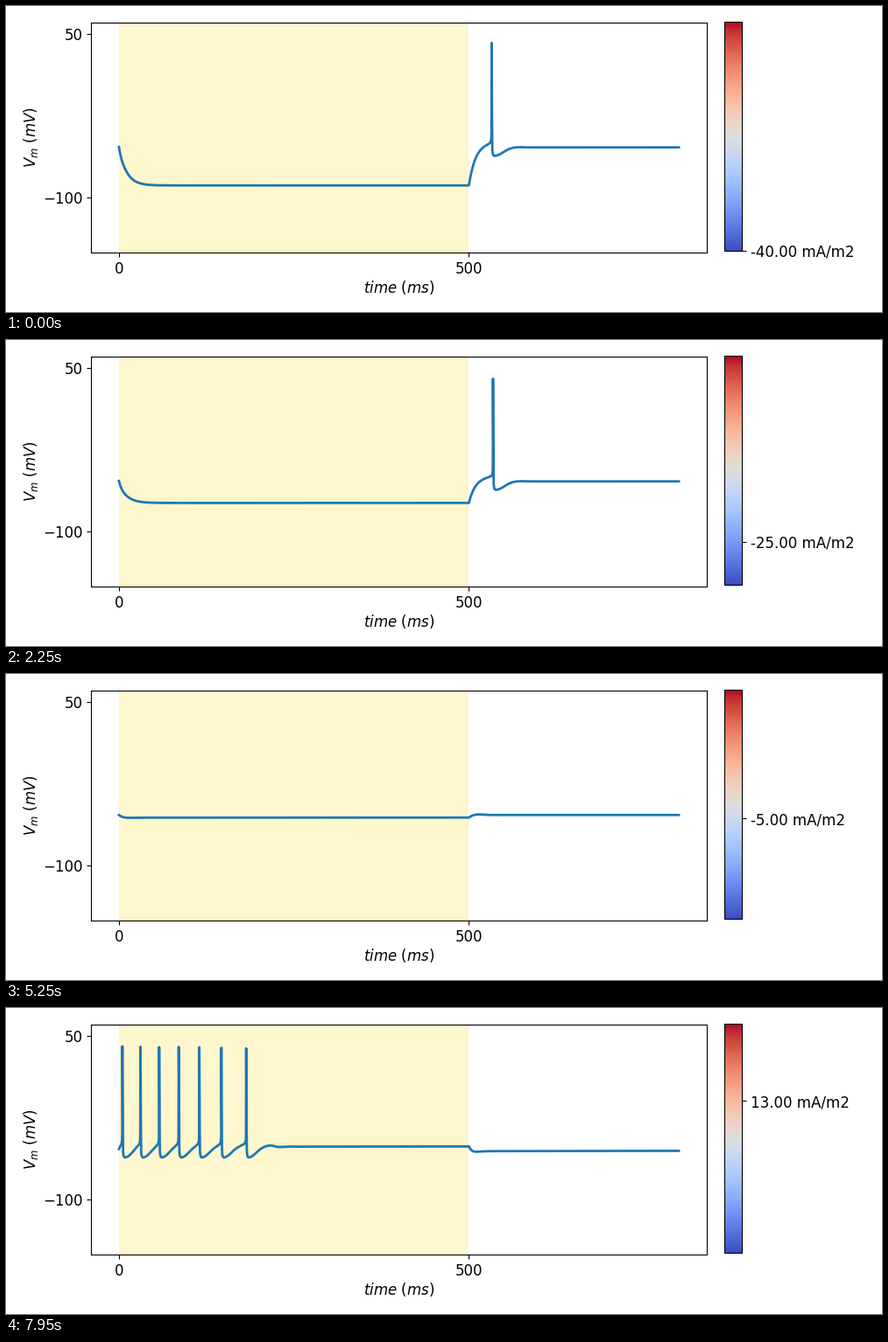
A matplotlib script for the animation above (8000 ms loop, 1000 px wide and 350 px high).

```python
import numpy as np
import matplotlib.pyplot as plt
from matplotlib.animation import FuncAnimation
from matplotlib.cm import ScalarMappable
from matplotlib.colors import Normalize

W, H, DPI = 1000, 350, 100
INTERVAL, HOLD, FRAMES = 50, 3, 160      # ms per tick, ticks per current step, ticks per loop
I_MIN, I_MAX = -40, 40                   # mA/m2
STIM_END, T_END = 500, 800               # ms
DT, SKIP = 0.025, 2                      # time step (ms), steps per stored sample

# Touch sensory neuron: potentials in mV, conductances in S/m2, times in ms
V_REST = -53.58
E_NA, E_K, E_CA, E_LEAK, E_PUMP = 45.0, -62.0, 60.0, -48.0, -300.0
G_NA, G_K, G_CA, G_KCA, G_LEAK, G_PUMP = 3500.0, 900.0, 20.0, 236.0, 1.0, 20.0
CM = 1e-2                                # F/m2
TAU_M, TAU_S = 0.1, 0.6
TAU_NA, TAU_CA, TAU_PUMP, TAU_KCA = 16000.0, 1250.0, 100.0, 10.0
AREA = 6434e-6                           # membrane area, scaled from mA to nA
K_NA, K_CA = 0.016 * AREA, 0.1 * AREA


def boltz(v, half, slope):
    return 1 / (1 + np.exp((v - half) / slope))


def m_inf(v):
    return boltz(v, -35, -5)


def h_inf(v):
    return boltz(v, -50, 9) ** 2


def n_inf(v):
    return boltz(v, -22, -9)


def s_inf(v):
    return boltz(v, -10, -2.8)


def tau_h(v):
    return 13.8 * boltz(v, -36, 3.5) + 0.2


def tau_n(v):
    return 5 * boltz(v, -10, 10) + 1


def simulate(currents):
    """Membrane potential for all currents at once, gates staggered by half a step."""
    v = np.full(len(currents), V_REST)
    m, h, n, s = m_inf(v), h_inf(v), n_inf(v), s_inf(v)
    c_na = -K_NA * G_NA * m**3 * h * (v - E_NA)
    c_ca = -K_CA * G_CA * s * (v - E_CA)
    a_na, a_ca = c_na.copy(), c_ca.copy()
    k_m, k_s = 1 - np.exp(-DT / TAU_M), 1 - np.exp(-DT / TAU_S)

    steps = round(T_END / DT)
    trace = np.empty((steps // SKIP + 1, len(currents)))
    trace[0] = v
    for k in range(steps):
        m += (m_inf(v) - m) * k_m
        s += (s_inf(v) - s) * k_s
        h += (h_inf(v) - h) * (1 - np.exp(-DT / tau_h(v)))
        n += (n_inf(v) - n) * (1 - np.exp(-DT / tau_n(v)))

        g_na, g_ca = G_NA * m * m * m * h, G_CA * s
        g_k, g_pump = G_K * n * n + G_KCA * a_ca, G_PUMP * a_na
        c_na += (K_NA * g_na * (E_NA - v) - c_na) * (DT / TAU_NA)
        c_ca += (K_CA * g_ca * (E_CA - v) - c_ca) * (DT / TAU_CA)
        a_na += (c_na - a_na) * (DT / TAU_PUMP)
        a_ca += (c_ca - a_ca) * (DT / TAU_KCA)

        g = g_na + g_ca + g_k + g_pump + G_LEAK
        drive = (g_na * E_NA + g_ca * E_CA + g_k * E_K
                 + g_pump * E_PUMP + G_LEAK * E_LEAK)
        if k * DT < STIM_END:
            drive = drive + currents
        v_inf = drive / g
        v = v_inf + (v - v_inf) * np.exp(-g * DT * 1e-3 / CM)
        if (k + 1) % SKIP == 0:
            trace[(k + 1) // SKIP] = v
    return trace


def px_axes(left, top, right, bottom):
    """Axes placed by pixel edges, measured from the top left."""
    return fig.add_axes([left / W, 1 - bottom / H, (right - left) / W, (bottom - top) / H])


currents = I_MIN + np.arange(-(-FRAMES // HOLD), dtype=float)
traces = simulate(currents)
time = np.arange(len(traces)) * DT * SKIP

plt.rcParams["font.family"] = "DejaVu Sans"
plt.rcParams["font.size"] = 12
fig = plt.figure(figsize=(W / DPI, H / DPI), dpi=DPI, facecolor="white")

ax = px_axes(97, 19, 800, 282)
ax.axvspan(0, STIM_END, facecolor="#fef6cc", edgecolor="none", zorder=0.5)
line, = ax.plot(time, traces[:, 0], color="#1f77b4", lw=2)
ax.set(xlim=(-40, 840), ylim=(-150, 60), xticks=[0, 500], yticks=[-100, 50])
fig.text(448.5 / W, 1 - 332 / H, r"$time\ (ms)$", ha="center", va="bottom")
fig.text(18 / W, 1 - 150.5 / H, r"$V_m\ (mV)$", ha="left", va="center", rotation=90)

cax = px_axes(820, 18, 840, 280)
cbar = fig.colorbar(ScalarMappable(Normalize(I_MIN, I_MAX), "coolwarm"), cax=cax)


def update(i):
    k = i // HOLD
    line.set_ydata(traces[:, k])
    cbar.set_ticks([currents[k]], labels=[f"{currents[k]:.2f} mA/m2"])
    return [line]


anim = FuncAnimation(fig, update, frames=FRAMES, interval=INTERVAL, repeat=True,
                     repeat_delay=0, cache_frame_data=False)
plt.show()
```
